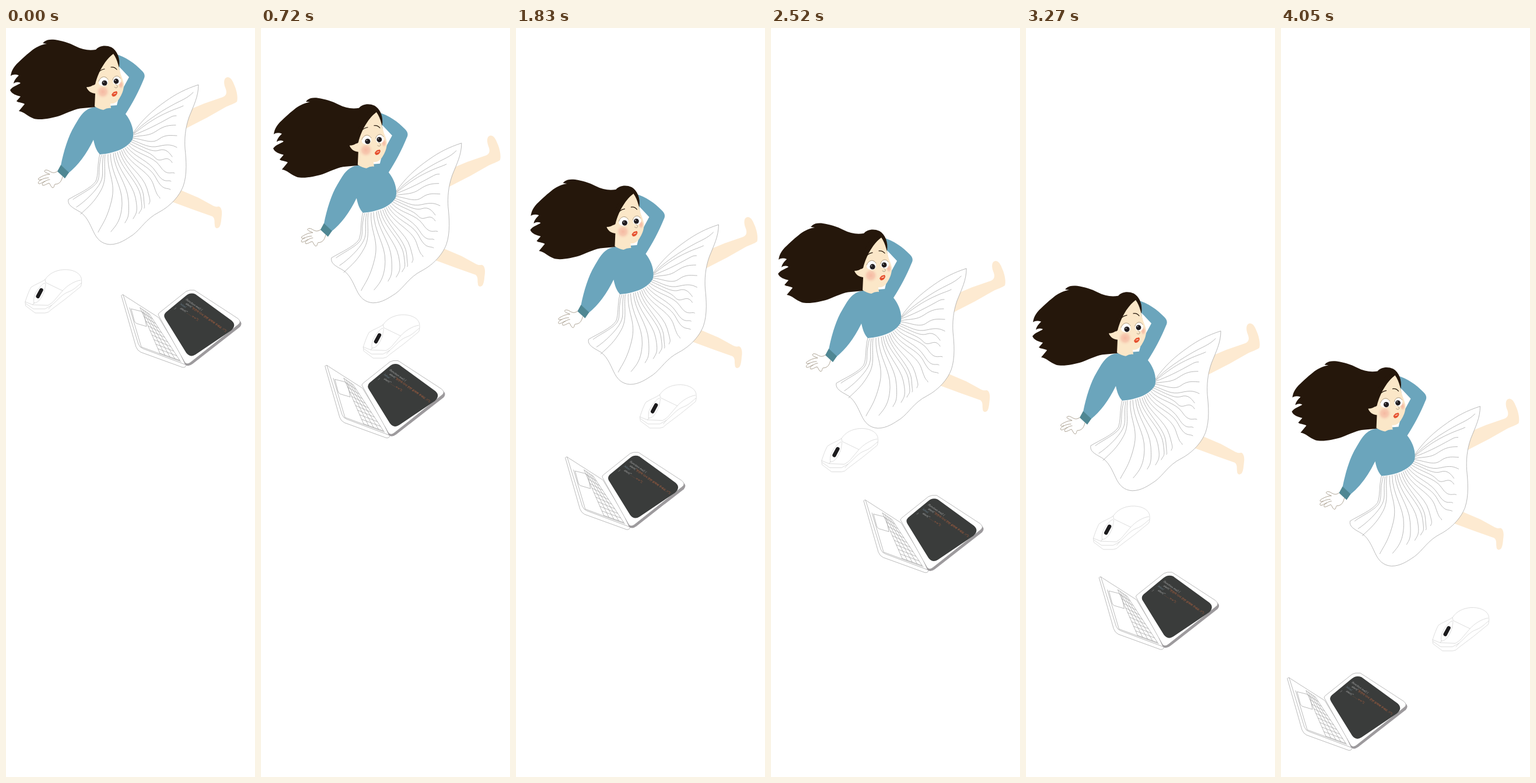
Recreate the animation shown at these times as an HTML page. Size 427x1280 px, loop 4080 ms.

```html
<!DOCTYPE html>
<html lang="ko">
<head>
<meta charset="utf-8">
<title>Falling</title>
<style>
html, body { margin: 0; width: 100%; height: 100%; overflow: hidden; background: #fff; }
svg { display: block; width: 100%; height: 100%; }
.skin { fill: #fdead1; }
.face { fill: #fbe7c8; }
.knit { fill: #6ba5bc; }
.hair { fill: #25170b; }
.thin { fill: none; stroke: #9d9d9d; stroke-width: .7; stroke-linecap: round; stroke-linejoin: round; }
.paper { fill: #fff; }
.faint { stroke: #c6c6c6; stroke-width: .6; }
.crease { stroke: #8c7d68; }
.brow { fill: none; stroke: #25170b; stroke-width: 1.2; stroke-linecap: round; }
.code { font: 4.6px "Noto Sans CJK KR", "Noto Sans CJK", "Noto Sans", sans-serif; fill: #b9b9b9; white-space: pre; }
.str { fill: #c4673f; }
.key { fill: #6f8796; }
</style>
</head>
<body>
<svg viewBox="0 0 427 1280" preserveAspectRatio="none">
  <defs>
    <radialGradient id="blush">
      <stop offset="0" stop-color="#f5b9a2"/>
      <stop offset=".5" stop-color="#f6c2aa" stop-opacity=".8"/>
      <stop offset="1" stop-color="#fbe7c8" stop-opacity="0"/>
    </radialGradient>
  </defs>

  <g id="girl">
    <!-- legs -->
    <path class="skin" d="M304 144L340 129L372 118C379 115 379 109 376 102C373 94 373 85 380 84C387 84 390 94 393 101C396 109 398 120 396 126C391 130 384 131 375 136L345 153L304 174Z"/>
    <path class="skin" d="M297 276L330 290L352 302C357 305 360 306 365 305C369 306 371 313 370 320C369 328 369 335 366 340C362 344 358 342 358 337C357 331 359 326 354 322L320 310L282 296Z"/>
    <!-- skirt -->
    <path class="thin paper" d="M161 215C156 235 159 250 154 262C146 274 122 284 107 293C105 302 114 307 123 312C138 319 144 336 150 348C156 361 164 369 178 370C194 370 206 361 217 354C232 343 240 326 262 315C283 304 298 286 304 270C311 250 309 225 307 206C306 190 307 172 314 152C322 132 330 117 330 97C308 104 291 113 274 125C251 141 233 157 217 181Z"/>
    <path class="thin" d="M164 217C157 240 162 251 157 262S125 285 115 293M167 217C163 240 169 250 162 264S135 297 121 306M170 216C167 240 174 257 163 277S142 305 128 318M175 216C173 248 189 262 181 295S163 338 158 349M179 215C180 250 200 270 199 300S187 339 180 348M184 214C186 245 208 265 210 295S208 325 204 333M187 213C192 245 217 265 222 290S223 317 218 326M191 212C196 240 227 262 231 288S232 308 228 317M195 211C203 240 234 262 236 288S238 303 237 308M198 209C205 235 235 250 242 275S247 295 245 301"/>
    <path class="thin" d="M201 207C212 235 245 243 253 268S262 285 264 291M204 205C220 232 245 233 257 256S275 272 282 276M207 203C222 222 245 226 258 247S278 258 283 262M210 200C225 217 252 218 264 236S283 245 289 248M212 197C232 210 246 211 256 222S275 214 285 230M214 194C235 203 250 213 262 209S280 213 285 220M215 191C235 198 245 206 262 202S285 200 293 204M217 188C235 190 250 199 262 190S285 184 293 184M218 186C235 183 245 185 258 176S280 166 291 166M218 183C240 175 255 167 270 159S285 150 292 150M219 181C245 160 260 152 275 145S296 137 304 133M219 180C235 162 265 143 283 133S310 121 321 110"/>
    <!-- sweater -->
    <path class="knit" d="M186 44C206 49 221 61 233 73C238 78 239 82 236 88C228 108 216 130 205 147C215 159 221 177 217 190C209 205 187 214 161 216C155 210 152 201 150 191Q132 228 107 248L94 235C99 210 107 184 117 168C126 153 133 138 152 135L190 132L198 100Z"/>
    <path class="paper" d="M194 66L211 84L199 106Z"/>
    <path fill="#4f8793" d="M94 234L108 247L101 257L88 245Z"/>
    <!-- hair -->
    <path class="hair" d="M194 66C196 52 191 39 181 33C170 28 159 31 154 37C142 39 131 37 119 31C108 25 96 22 84 20C76 19 70 20 66 23L63 26L70 27C62 28 53 32 46 37C36 45 29 51 22 58C11 68 9 75 8 82C12 79 17 79 22 81C18 85 14 89 13 95C17 92 21 92 25 94C20 98 12 99 7 106C10 113 18 115 25 117L18 125C22 128 28 127 32 130L22 142C31 143 37 151 48 155C60 158 78 154 92 150C108 144 118 138 132 137L154 135L165 90Z"/>
    <!-- hand -->
    <path class="thin face crease" d="M88 245C82 249 79 247 75 245C71 242 66 242 66 245C68 248 72 248 75 250C68 250 60 254 56 257C54 260 58 260 61 259C57 261 54 264 56 266C59 267 63 263 67 262C63 264 61 267 63 269C67 269 70 266 74 265C76 267 77 272 80 273C83 273 82 269 84 267C91 267 95 263 97 254"/>
    <path class="thin crease" d="M61 259C65 257 69 256 73 256M67 262C70 260 73 259 75 259"/>
    <!-- face -->
    <path class="face" d="M184 44C192 55 194 70 197 80C200 88 202 92 202 97C202 106 199 113 194 121C190 127 185 130 179 129L180 137Q174 136 167 140Q160 139 152 134L153 112C145 111 140 107 138 101C143 101 148 99 152 96C155 78 165 58 184 44Z"/>
    <path class="hair" d="M150 98C148 80 158 55 171 42L184 44C172 53 159 72 153 96Z"/>
    <circle cx="166" cy="109" r="13" fill="url(#blush)"/>
    <ellipse cx="197" cy="97" rx="5" ry="8" fill="url(#blush)"/>
    <path class="paper" d="M159 94C160 85 168 81 174 87C178 96 171 101 165 99Q160 98 159 94Z"/>
    <path class="paper" d="M183 90C184 83 191 80 196 86C199 93 194 98 189 97Q183 96 183 90Z"/>
    <path class="thin crease" d="M159 91C162 83 170 80 175 88M183 89C184 82 192 79 196 86"/>
    <g fill="#211d20">
      <circle cx="169" cy="94" r="4.6"/>
      <circle cx="189" cy="91" r="4.4"/>
    </g>
    <g class="paper">
      <circle cx="167.5" cy="92.5" r=".8"/>
      <circle cx="187.5" cy="89.5" r=".8"/>
    </g>
    <path class="brow" d="M155 81C158 75 163 71 169 70M180 67Q186 66 190 71"/>
    <path class="thin crease" d="M187 95C190 98 193 100 190 102Q188 103 186 101"/>
    <path fill="#e6512f" d="M181 114C183 110 186 108 187 109C189 107 191 108 191 111C190 115 186 118 183 117Q182 116 181 114Z"/>
    <path fill="#fff0e6" d="M183.5 113Q187 110.5 189.5 111Q187 113.5 183.5 113Z"/>
  </g>

  <g id="mouse">
    <path class="thin faint paper" d="M33 468C36 458 40 448 43 443C50 438 60 435 67 430C74 419 86 414 98 413C112 412 126 417 129 427C130 432 130 438 128 442L102 463L78 481Q73 487 67 487H50L34 475Z"/>
    <path class="thin faint" d="M33 468L46 473L48 470M34 471L47 480H67L78 474M46 473L72 474C79 470 82 467 85 463L97 449L68 435L67 430M97 449C105 440 118 432 128 431M78 474C91 463 96 455 107 451S123 440 129 436M78 474L73 480"/>
    <path class="thin faint paper" d="M48 470C46 460 51 451 57 444C61 439 66 434 68 437C67 447 64 456 59 463Q54 470 48 470Z"/>
    <path d="M60.5 447.8L54.7 458.6" fill="none" stroke="#1c1b1d" stroke-width="6.5" stroke-linecap="round"/>
  </g>

  <g id="laptop">
    <path class="thin paper" d="M198 457C199 455 202 456 204 458L262 495L309 572Q310 581 303 580L231 554Q225 551 223 545Z"/>
    <path class="thin" d="M201 456L227 540Q229 546 235 548L307 575M212 478L232 545L300 570M215 480L231 484Q236 485 237 490L241 510L224 505Q221 504 220 500Z"/>
    <path id="keys" class="thin"/>
    <path fill="#9d9a9d" d="M300 560L399 499Q407 504 401 511L320 574Q312 580 307 575Z"/>
    <path class="thin paper" d="M262 492Q259 489 265 485L309 450Q314 447 323 448L397 496Q405 502 398 507L317 571Q311 576 307 572Z"/>
    <path fill="#3a3c3b" d="M273 497Q269 491 274 486L308 458Q316 451 325 455L387 500Q396 508 386 517L325 558Q316 564 309 555Z"/>
    <g id="code" class="code" transform="matrix(.82 .57 -.77 .63 309 463)"></g>
  </g>
</svg>
<script>
const LOOP = 4080, STEP = 30;
const TIMES = [0, 1350, 2820, LOOP];
const $ = id => document.getElementById(id);

// Offsets reached at each of TIMES; straight moves between them.
const paths = {
  girl: [[0, 0], [26, 187], [-.3, 346.5], [11.8, 554.5]],
  mouse: [[0, 0], [267, 144.7], [-.8, 304], [232.6, 584.2]],
  laptop: [[0, 0], [-165, 226], [-6.5, 382.7], [-191.4, 661]]
};

const lerp = (a, b, u) => a + (b - a) * u;
const mix = (p, q, u) => p.map((v, i) => lerp(v, q[i], u));
const line = (p, q) => `M${p}L${q}`;

function drawKeys() {
  const [a, b, c, d] = [[230, 478], [246, 489], [298, 568], [264, 556]];
  let path = '';
  for (let i = 0; i <= 4; i++) path += line(mix(a, b, i / 4), mix(d, c, i / 4));
  for (let i = 0; i <= 10; i++) path += line(mix(a, d, i / 10), mix(b, c, i / 10));
  $('keys').setAttribute('d', path);
}

function drawCode() {
  const rows = [
    [0, '(function me() {'],
    [6, 'alert(', 'str', '"천천히 다시 한번 살펴봐 주세요..!!");'],
    [0, '', 'key', '}else{'],
    [6, 'alert("', 'str', '........ㅠㅠ");'],
    [0, '}']
  ];
  $('code').innerHTML = rows.map(([x, plain, kind, rest], i) =>
    `<text x="${x}" y="${i * 6.2 + 2}">${plain}${rest ? `<tspan class="${kind}">${rest}</tspan>` : ''}</text>`
  ).join('');
}

function render(ms) {
  const t = Math.floor(ms % LOOP / STEP) * STEP;
  const k = TIMES.findIndex(end => t < end);
  const u = (t - TIMES[k - 1]) / (TIMES[k] - TIMES[k - 1]);
  for (const id in paths) {
    const [x, y] = mix(paths[id][k - 1], paths[id][k], u);
    $(id).setAttribute('transform', `translate(${x.toFixed(2)} ${y.toFixed(2)})`);
  }
}

drawKeys();
drawCode();
render(0);
const start = performance.now();
requestAnimationFrame(function tick(now) {
  render(Math.max(0, now - start));
  requestAnimationFrame(tick);
});
</script>
</body>
</html>
```
